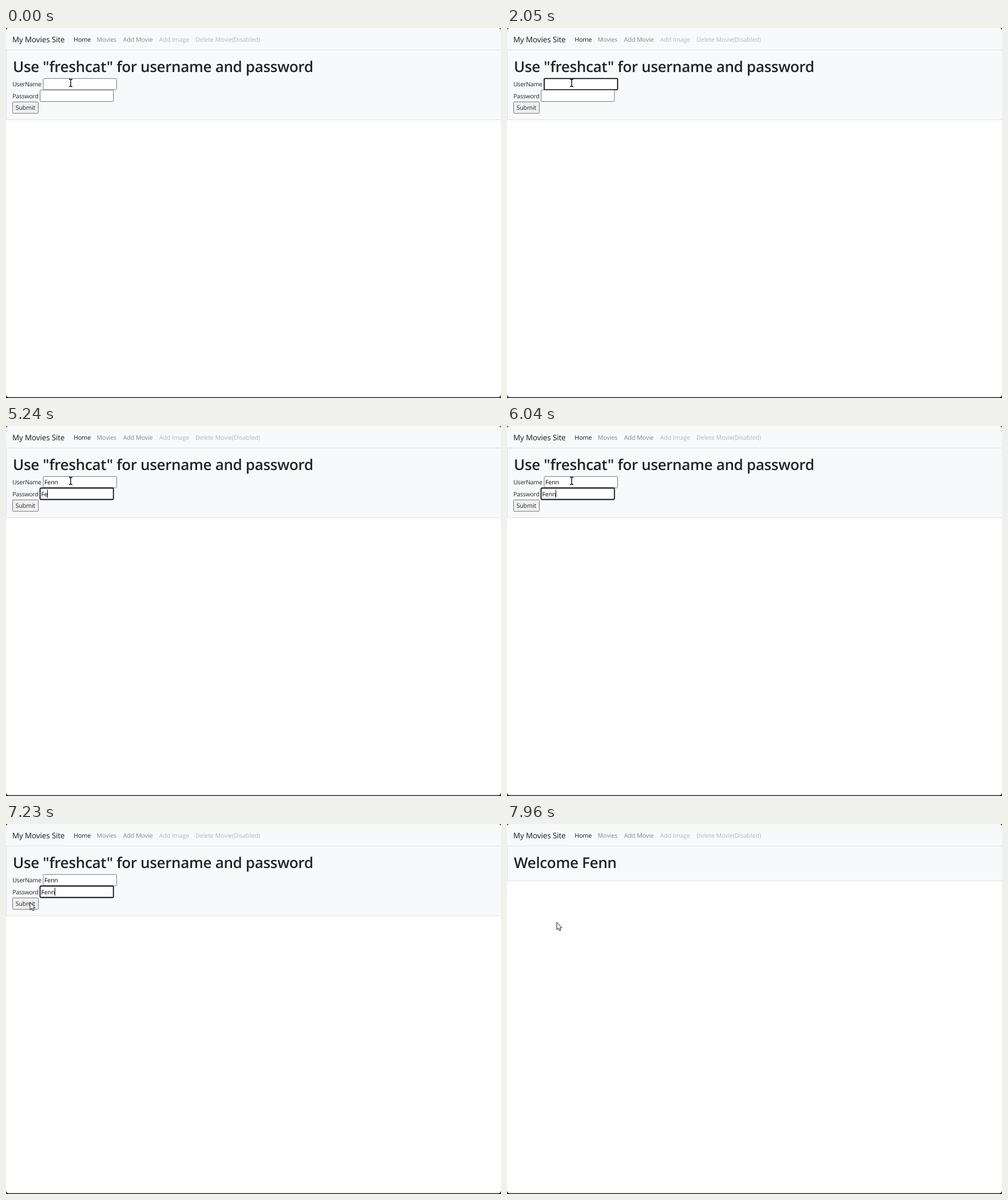
These frames come from a looping animation (865 px wide and 647 px high, 8 s). An HTML page:

```html
<!DOCTYPE html>
<html lang="en">
<head>
<meta charset="utf-8">
<title>My Movies Site</title>
<style>
  html, body { margin: 0; width: 100%; height: 100%; overflow: hidden; background: #2b2a30; }
  svg { display: block; width: 865px; height: 647px; }
  text {
    font: 10.5px "Open Sans", "Noto Sans", sans-serif;
    letter-spacing: -.08px;
    text-rendering: geometricPrecision;
    white-space: pre;
    fill: #212529;
  }
  .brand { font-size: 13.4px; fill: #16181a; }
  .nav text { font-size: 10.7px; fill: #7f8786; }
  .nav .active { fill: #16181a; }
  .nav .off { fill: #b3b7b8; }
  .title { font-size: 26px; font-weight: 600; letter-spacing: -.33px; }
  .label { letter-spacing: -.22px; }
  .typed { fill: #000; }
  .panel { fill: #f8f9fb; stroke: #dee2e6; }
  .box { fill: #fff; stroke: #767676; }
  .box.focus { stroke: #101010; stroke-width: 1.8; }
  .button { fill: #efefef; stroke: #767676; }
  .beam { fill: none; stroke: #000; stroke-width: 1.4; }
  .arrow { fill: #fff; stroke: #000; stroke-width: .9; stroke-linejoin: round; }
</style>
</head>
<body>
<svg viewBox="0 0 865 647">
  <rect width="865" height="645.6" rx="5" fill="#fff"/>
  <path d="M0 38V5Q0 0 5 0H860Q865 0 865 5V38Z" fill="#f8f9fb"/>
  <text class="brand" x="11" y="24.5">My Movies Site</text>
  <g class="nav">
    <text class="active" x="118.2" y="23.5">Home</text>
    <text x="158.5" y="23.5">Movies</text>
    <text x="204.6" y="23.5">Add Movie</text>
    <text class="off" x="267.5" y="23.5">Add Image</text>
    <text class="off" x="331" y="23.5">Delete Movie(Disabled)</text>
  </g>
  <rect class="panel" id="panel" x=".5" y="38.5" width="866" height="122"/>
  <text class="title" id="title" x="12" y="77"></text>
  <g id="form">
    <text class="label" x="11.2" y="102">UserName</text>
    <text class="label" x="11.2" y="122.5">Password</text>
    <rect class="box" id="userBox" x="65" y="88.3" width="128.3" height="19.6" rx="1.5"/>
    <rect class="box" id="passBox" x="59.5" y="108.5" width="128.2" height="20" rx="1.5"/>
    <text class="typed" id="user" x="67" y="102"></text>
    <text class="typed" id="pass" x="61.5" y="122.5"></text>
    <rect class="button" x="11.5" y="129.2" width="45" height="20" rx="1.5"/>
    <text x="16.8" y="143">Submit</text>
    <rect id="caret" width="1" height="14"/>
  </g>
  <path class="beam" id="beam" d="M-3 -6.5Q-.5 -6.5 0 -5.3Q.5 -6.5 3 -6.5M0 -5.3V5.3M-3 6.5Q-.5 6.5 0 5.3Q.5 6.5 3 6.5"/>
  <path class="arrow" id="arrow" d="M0 0V13.2L3 10.5L5 14.7L7 13.8L5.1 9.7H9Z"/>
</svg>
<script>
const LOOP = 8000, BLINK = 530, SENT = 7560, NAME = "Fenn";
const $ = id => document.getElementById(id);
const set = (id, attr, value) => $(id).setAttribute(attr, value);
const show = (id, on) => set(id, "visibility", on ? "visible" : "hidden");

const fields = [
  { id: "user", focus: 1520, blur: 4310, keys: [2720, 2910, 3180, 3320] },
  { id: "pass", focus: 4310, blur: 7430, keys: [4910, 5240, 5980, 6040] },
];

const easeOut = (t, start, length) => {
  const p = Math.min(1, Math.max(0, (t - start) / length));
  return 1 - (1 - p) ** 2;
};

function drawField({ id, focus, blur, keys }, t) {
  const text = $(id), active = t >= focus && t < blur;
  const pressed = keys.filter(time => time <= t);
  text.textContent = NAME.slice(0, pressed.length);
  $(id + "Box").classList.toggle("focus", active);
  if (!active) return;

  // The blink restarts at every key press.
  const sinceInput = t - Math.max(focus, ...pressed);
  show("caret", sinceInput % (2 * BLINK) < BLINK);
  set("caret", "x", Math.floor(+text.getAttribute("x") + text.getComputedTextLength()));
  set("caret", "y", text.getAttribute("y") - 11);
}

function drawPointer(t) {
  const toButton = easeOut(t, 6770, 430), away = easeOut(t, 7860, 100);
  const x = 113 - 71 * toButton + 45 * away;
  const y = 96 + 41 * toButton + 35 * away;
  const overField = y < 129;
  show("beam", overField);
  show("arrow", !overField);
  set(overField ? "beam" : "arrow", "transform", `translate(${x} ${y})`);
}

function draw(t) {
  const sent = t >= SENT;
  $("title").textContent = sent ? `Welcome ${NAME}` : 'Use "freshcat" for username and password';
  set("panel", "height", sent ? 61 : 122);
  set("form", "display", sent ? "none" : "inline");
  show("caret", false);
  fields.forEach(field => drawField(field, t));
  drawPointer(t);
}

function tick() {
  draw(performance.now() % LOOP);
  requestAnimationFrame(tick);
}
tick();
</script>
</body>
</html>
```
